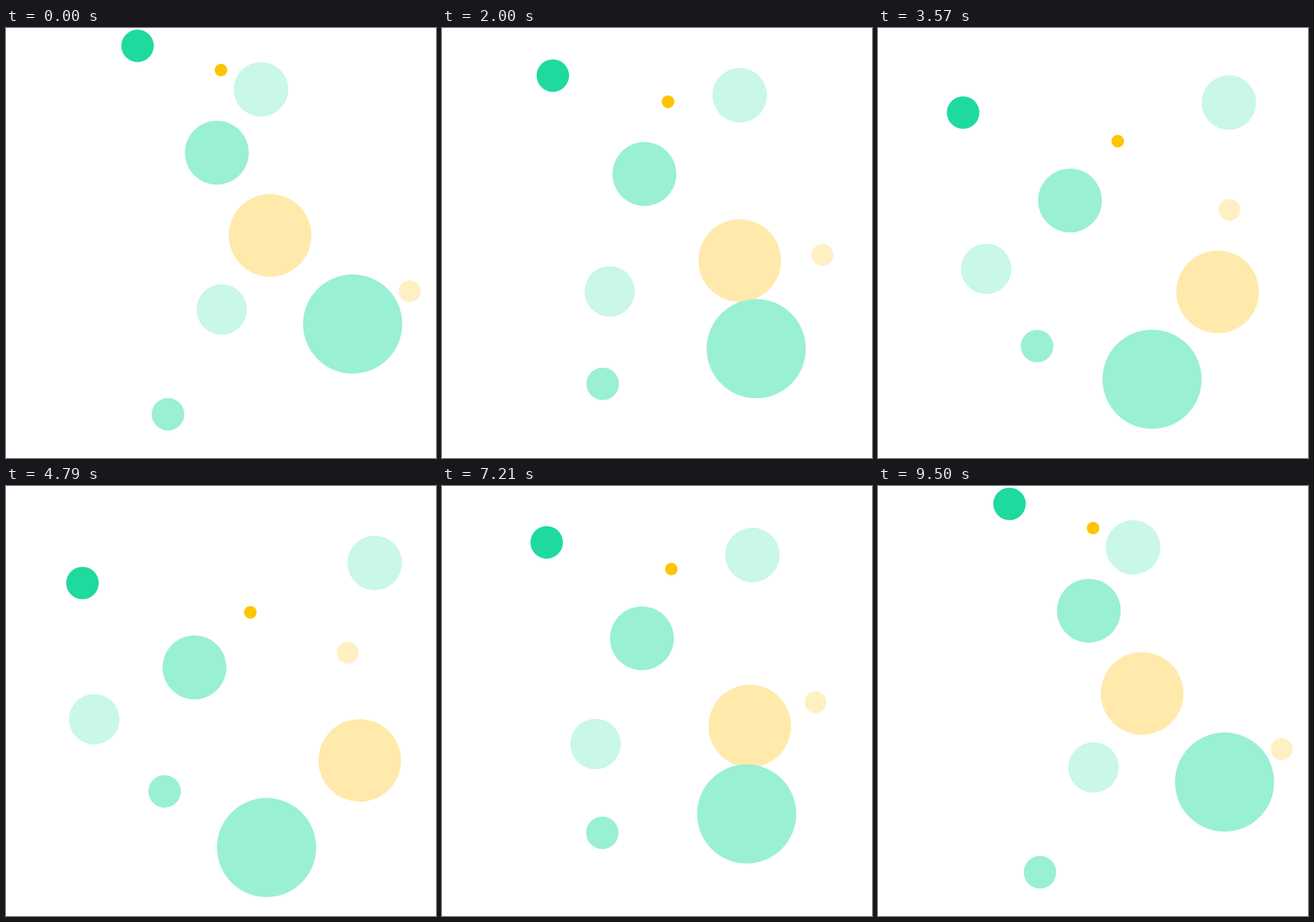
An HTML page for the animation above (9570 ms loop, 640x640 px).

```html
<!DOCTYPE html>
<html lang="en">
<head>
<meta charset="utf-8">
<title>Drifting dots</title>
<style>
  html, body { margin: 0; width: 100%; height: 100%; overflow: hidden; background: #fff; }
  svg { display: block; width: 100%; height: 100%; }
</style>
</head>
<body>
<svg id="stage" viewBox="0 0 640 640"></svg>
<script>
const LOOP = 9570, STEPS = 134;

// x, y, radius, travel x, travel y, colour
const dots = [
  [393, 308.6, 61.5, 133.5, 99.8, '#ffeaac'],
  [515.9, 440.6, 73.8, -128.1, 97.5, '#9af0d4'],
  [600.9, 391.7, 16.3, -92.3, -143.4, '#fff0c4'],
  [313.8, 185.6, 47.5, -33.3, 84.4, '#9af0d4'],
  [379.5, 91.3, 40.6, 169.3, 23.3, '#c9f7e8'],
  [320.9, 419, 37.5, -189.6, -71.8, '#c9f7e8'],
  [241.1, 574.9, 24.2, -5.1, -120.4, '#9af0d4'],
  [195.8, 26.5, 24.2, -82, 117.9, '#1fda9f'],
  [320, 62.6, 9.4, 43.7, 125.4, '#ffc400']
];

const stage = document.getElementById('stage');
const circles = dots.map(([, , r, , , fill]) => {
  const c = document.createElementNS('http://www.w3.org/2000/svg', 'circle');
  c.setAttribute('r', r);
  c.setAttribute('fill', fill);
  return stage.appendChild(c);
});

// Smoothstep with a slightly softer arrival
const ease = x => x * x * (3 - 2 * x) + (x * (1 - x)) ** 2 * (x - 0.21) * (x - 0.57);

// 14 steps per second, on a 10 ms clock
const stepAt = ms => Math.floor((Math.floor(ms / 10) + 0.5) * 0.14);

function draw(ms) {
  const step = stepAt(ms % LOOP);
  const p = ease(Math.min(step, STEPS - step) / (STEPS / 2));
  dots.forEach(([x, y, , dx, dy], i) => {
    circles[i].setAttribute('cx', x + dx * p);
    circles[i].setAttribute('cy', y + dy * p);
  });
}

function tick() {
  draw(performance.now());
  requestAnimationFrame(tick);
}
draw(0);
requestAnimationFrame(tick);
</script>
</body>
</html>
```
